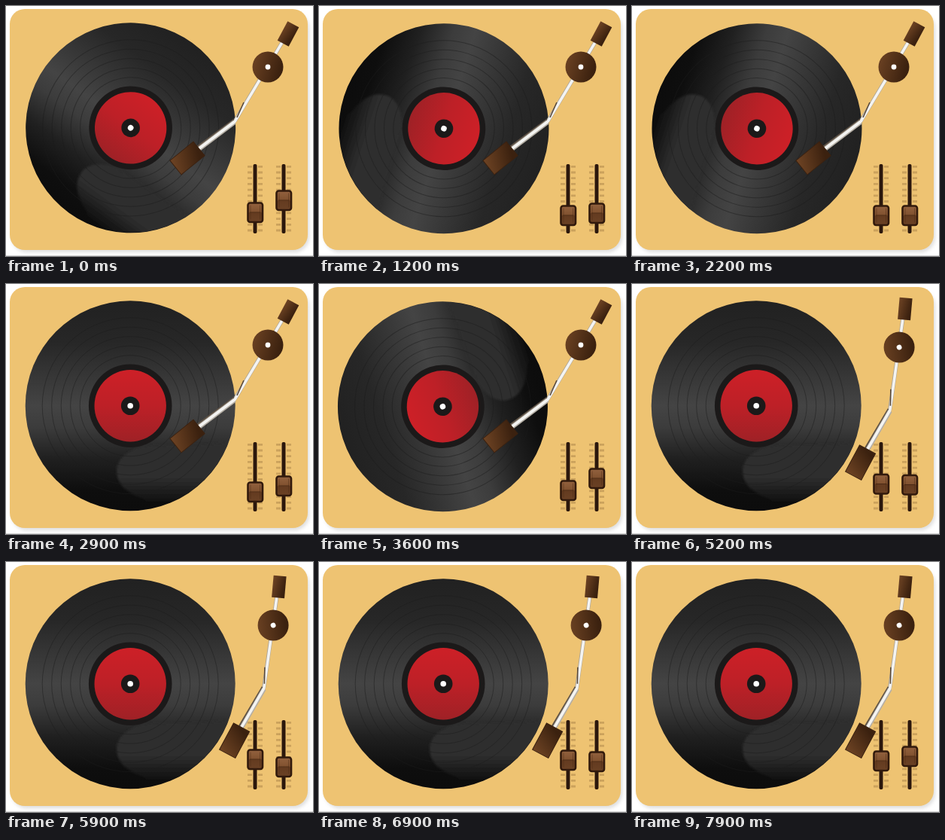
Recreate the animation shown at these times as an HTML page. Size 408 by 332 pixels, loop 8000 ms.

```html
<!DOCTYPE html>
<html lang="en">
<head>
<meta charset="utf-8">
<title>Turntable</title>
<style>
  html, body { margin: 0; width: 100%; height: 100%; overflow: hidden; background: #fff; }
  svg { display: block; width: 408px; height: 332px; }
</style>
</head>
<body>
<svg viewBox="0 0 408 332">
  <defs>
    <linearGradient id="vinyl" x2="0" y2="1">
      <stop offset="0" stop-color="#212121"/>
      <stop offset=".2" stop-color="#272727"/>
      <stop offset=".5" stop-color="#444"/>
      <stop offset=".6" stop-color="#3c3c3c"/>
      <stop offset=".75" stop-color="#202020"/>
      <stop offset=".9" stop-color="#0e0e0e"/>
      <stop offset="1" stop-color="#0c0c0c"/>
    </linearGradient>
    <linearGradient id="glare" gradientUnits="userSpaceOnUse" x1="0" y1="52" x2="0" y2="130">
      <stop offset="0" stop-color="#2f2f2f"/>
      <stop offset=".55" stop-color="#2d2d2d"/>
      <stop offset="1" stop-color="#2d2d2d" stop-opacity="0"/>
    </linearGradient>
    <linearGradient id="label" x2="0" y2="1">
      <stop offset="0" stop-color="#cd2027"/>
      <stop offset=".5" stop-color="#bd2027"/>
      <stop offset="1" stop-color="#9f2126"/>
    </linearGradient>
    <linearGradient id="wood" x2="1" y2=".3">
      <stop offset="0" stop-color="#6f4424"/>
      <stop offset="1" stop-color="#3b210f"/>
    </linearGradient>
    <linearGradient id="knob" x2="0" y2="1">
      <stop offset="0" stop-color="#93623f"/>
      <stop offset=".48" stop-color="#80512f"/>
      <stop offset=".52" stop-color="#643b20"/>
      <stop offset="1" stop-color="#6b4225"/>
    </linearGradient>
    <clipPath id="disc"><circle r="139"/></clipPath>
    <filter id="soft" x="-5%" y="-5%" width="110%" height="112%">
      <feGaussianBlur stdDeviation="2.5"/>
    </filter>
    <filter id="feather"><feGaussianBlur stdDeviation="1.5"/></filter>
  </defs>

  <rect x="8" y="10" width="395" height="317" rx="20" fill="#aaa" opacity=".4" filter="url(#soft)"/>
  <path d="M0 331.5H408" stroke="#d6d6d6"/>
  <rect x="5" y="4" width="396" height="320" rx="20" fill="#eec372"/>

  <g id="record">
    <circle r="139.5" fill="url(#vinyl)"/>
    <g clip-path="url(#disc)">
      <path fill="url(#glare)" filter="url(#feather)"
        d="M150 46C100 55 50 51 18 54C-4 58 -19 72 -18 88C-17 104 -6 114 14 122C24 128 30 136 32 150H150Z"/>
    </g>
    <g id="grooves" fill="none" stroke="#1c1c1c" stroke-opacity=".5"/>
    <circle r="55.3" fill="#1b1919"/>
    <circle r="47.7" fill="url(#label)"/>
    <circle r="12.3" fill="#1b1919"/>
    <circle r="3.8" fill="#fff"/>
  </g>

  <g id="faders"></g>

  <g id="arm">
    <g fill="none" stroke-linejoin="round">
      <path d="M369 45L304 153" stroke="#aaa398" stroke-width="5"/>
      <path d="M304 152L254 189" stroke="#5d5145" stroke-width="5.5"/>
      <path d="M304 154L255 191" stroke="#b5afa5" stroke-width="6"/>
      <path d="M369 45L304 153.5L255 190.5" stroke="#f4f4f2" stroke-width="3.6"/>
      <path d="M316 128L307 148" stroke="#59493a" stroke-width="1.6"/>
    </g>
    <rect x="-8.5" y="-14.5" width="17" height="29" fill="url(#wood)" transform="translate(375 37) rotate(28)"/>
    <circle cx="348" cy="81" r="20.5" fill="url(#wood)"/>
    <circle cx="348" cy="81" r="3.4" fill="#fff"/>
    <rect x="-20" y="-12" width="40" height="24" fill="url(#wood)" stroke="#3a2110"
      transform="translate(241 202) rotate(-39)"/>
  </g>
</svg>
<script>
  const LOOP = 8000, STEP = 100, STOP = 4900;
  const LIFT = { from: 3900, to: 4850, angle: -22.9 };
  const FADERS = [
    { x: 331, keys: [[0, 274], [1200, 278], [2200, 278], [3600, 274], [4500, 269], [5900, 262], [7900, 264]] },
    { x: 369, keys: [[0, 258], [1200, 275], [1800, 279], [2200, 278], [3600, 258], [4500, 261], [5900, 272], [7900, 258]] }
  ];

  const byId = id => document.getElementById(id);

  function add(parent, tag, attrs) {
    const el = document.createElementNS("http://www.w3.org/2000/svg", tag);
    for (const name in attrs) el.setAttribute(name, attrs[name]);
    return parent.appendChild(el);
  }

  for (let r = 67; r < 120; r += 12.5) add(byId("grooves"), "circle", { r });

  for (const fader of FADERS) {
    const g = add(byId("faders"), "g", { transform: `translate(${fader.x} 0)` });
    for (let i = 0; i < 12; i++) {
      const y = 213.3 + i * 7.7;
      add(g, "path", { d: `M-10 ${y}H-4M4 ${y}H10`, stroke: "#cba25c", "stroke-width": 2.8 });
    }
    add(g, "rect", { x: -2.5, y: 210, width: 5, height: 92, rx: 2, fill: "#2b170c" });
    fader.knob = add(g, "g", {});
    add(fader.knob, "rect", {
      x: -9.5, y: -12.5, width: 19.5, height: 25.5, rx: 3,
      fill: "url(#knob)", stroke: "#321a0c", "stroke-width": 2.6
    });
    add(fader.knob, "path", { d: "M-7 0H7.5", stroke: "#4b2a15" });
    add(fader.knob, "path", { d: "M-6 -9.5V9.5M6.5 -9.5V9.5", stroke: "#4b2a15", "stroke-opacity": .45 });
  }

  function valueAt(keys, t) {
    const i = keys.findIndex(key => key[0] > t);
    if (i < 0) return keys[keys.length - 1][1];
    const [t0, v0] = keys[i - 1], [t1, v1] = keys[i];
    return v0 + (v1 - v0) * (t - t0) / (t1 - t0);
  }

  const easeInOut = p => p * p * (3 - 2 * p);

  function draw(t) {
    // One turn per second, on a spindle slightly below the disc's centre.
    const turn = 36 + Math.min(t, STOP) * 0.36;
    byId("record").setAttribute("transform", `translate(165.2 162.5) rotate(${turn % 360}) translate(0 -.8)`);

    const p = Math.min(1, Math.max(0, (t - LIFT.from) / (LIFT.to - LIFT.from)));
    byId("arm").setAttribute("transform", `rotate(${LIFT.angle * easeInOut(p)} 359 65)`);

    for (const { knob, keys } of FADERS) {
      knob.setAttribute("transform", `translate(0 ${valueAt(keys, t)})`);
    }
  }

  const start = performance.now();
  function tick() {
    const t = (performance.now() - start) % LOOP;
    draw(Math.floor(t / STEP) * STEP);
    requestAnimationFrame(tick);
  }
  tick();
</script>
</body>
</html>
```
